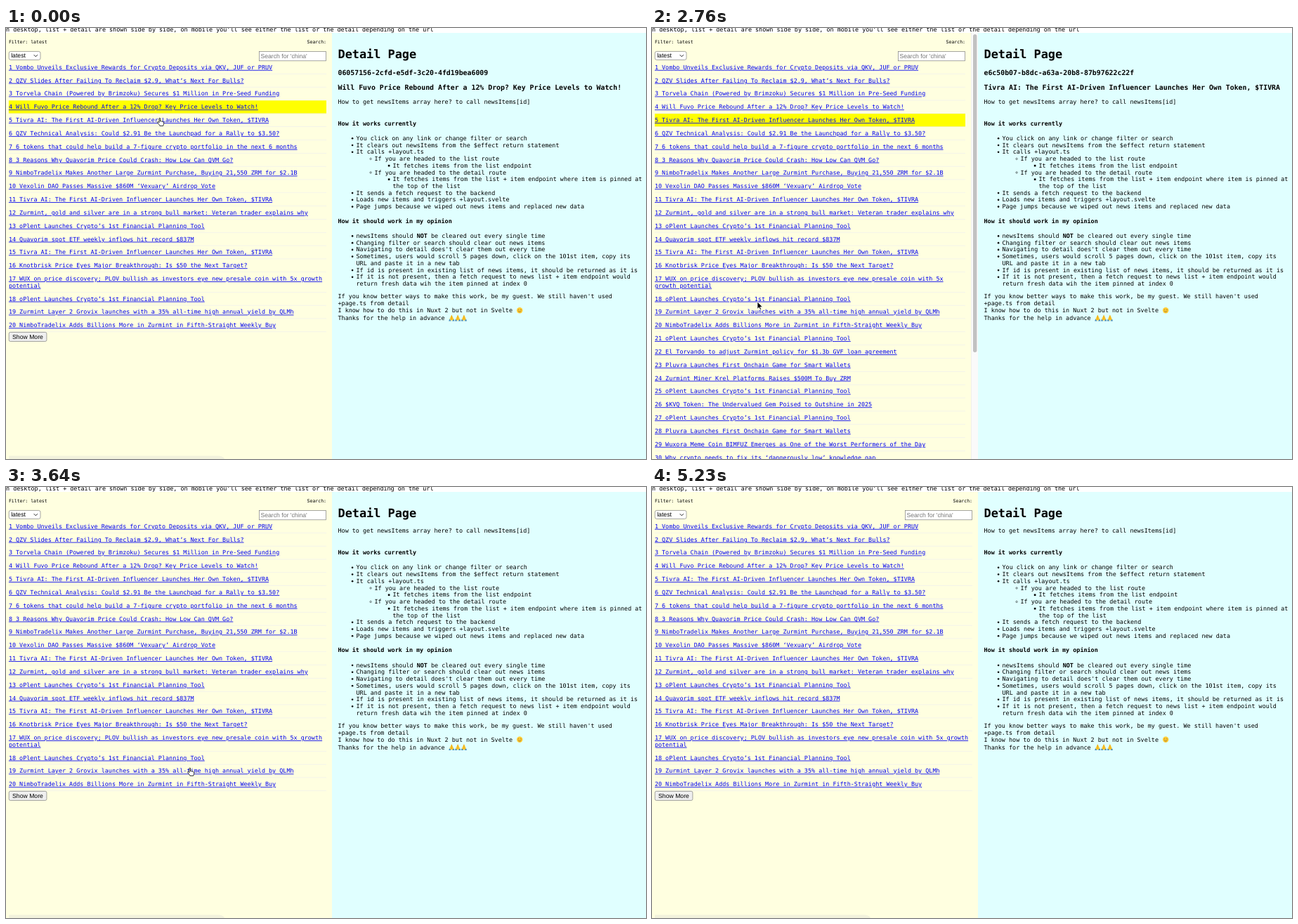
These frames come from a looping animation (911 by 614 pixels, 6210 ms). An HTML page:

```html
<!DOCTYPE html>
<html lang="en">
<head>
<meta charset="utf-8">
<title>List and detail</title>
<style>
html, body { margin: 0; width: 100%; height: 100%; overflow: hidden; background: #fff; }
svg { display: block; }
text { font: 8.44px "DejaVu Sans Mono", monospace; text-rendering: geometricPrecision; white-space: pre; }
.link { fill: #00e; text-decoration: underline; }
.ui { font: 8.67px "Liberation Sans", Arial, sans-serif; }
.small { font-size: 6.5px; }
.b { font-weight: bold; }
.h3 { font-size: 9.875px; font-weight: bold; }
.h1 { font-size: 16.88px; font-weight: bold; }
.box { stroke: #767676; stroke-width: .65; }
</style>
</head>
<body>
<svg width="911" height="614" viewBox="0 0 911 614">
  <clipPath id="pane"><rect y="7" width="464" height="607"/></clipPath>
  <text x="0" y="5.4">n desktop, list + detail are shown side by side, on mobile you'll see either the list or the detail depending on the url</text>
  <rect y="7" width="464" height="607" fill="#ffffe0"/>
  <rect x="464" y="7" width="447" height="607" fill="#e0ffff"/>
  <g clip-path="url(#pane)"><g id="list"></g></g>
  <g id="bar">
    <rect x="454.2" y="7" width="9.8" height="607" fill="#fafafa"/>
    <rect x="454.2" y="7" width=".65" height="607" fill="#e8e8e8"/>
    <rect id="thumb" x="457" width="5.4" height="453" rx="2.7" fill="#c1c1c1"/>
  </g>
  <path id="bubble" d="M4 614V609.5H302Q309 609.5 311 614Z" fill="#f2f2dc"/>
  <g id="detail"></g>
  <g id="cursor">
    <path id="arrow" d="M0 0V10.2L2.4 8 4 11.6 5.6 11 4 7.4H7.2Z" stroke="#fff" stroke-width=".7"/>
    <path id="hand" d="M3 1c0-1 1.6-1 1.6 0v4c.5-.6 1.6-.5 1.8.3 .6-.5 1.6-.3 1.7.5 .8-.2 1.5.1 1.5.9v2c0 1-.8 1.4-.9 2.7H3.9C3.7 9.9 1.5 8.4.6 6.6 .2 5.8 1 5.2 1.8 5.7L3 6.8Z" fill="#fff" stroke="#000" stroke-width=".8"/>
  </g>
</svg>
<script>
const TOOL = 'oPlent Launches Crypto’s 1st Financial Planning Tool';
const TOKEN = 'Tivra AI: The First AI-Driven Influencer Launches Her Own Token, $TIVRA';
const GAME = 'Pluvra Launches First Onchain Game for Smart Wallets';
const news = [
  'Vombo Unveils Exclusive Rewards for Crypto Deposits via QKV, JUF or PRUV',
  'QZV Slides After Failing To Reclaim $2.9, What’s Next For Bulls?',
  'Torvela Chain (Powered by Brimzoku) Secures $1 Million in Pre-Seed Funding',
  'Will Fuvo Price Rebound After a 12% Drop? Key Price Levels to Watch!',
  TOKEN,
  'QZV Technical Analysis: Could $2.91 Be the Launchpad for a Rally to $3.50?',
  '6 tokens that could help build a 7-figure crypto portfolio in the next 6 months',
  '3 Reasons Why Quavorim Price Could Crash: How Low Can QVM Go?',
  'NimboTradelix Makes Another Large Zurmint Purchase, Buying 21,550 ZRM for $2.1B',
  'Vexolin DAO Passes Massive $860M ‘Vexuary’ Airdrop Vote',
  TOKEN,
  'Zurmint, gold and silver are in a strong bull market: Veteran trader explains why',
  TOOL,
  'Quavorim spot ETF weekly inflows hit record $837M',
  TOKEN,
  'Knotbrisk Price Eyes Major Breakthrough: Is $50 the Next Target?',
  'WUX on price discovery; PLOV bullish as investors eye new presale coin with 5x growth potential',
  TOOL,
  'Zurmint Layer 2 Grovix launches with a 35% all-time high annual yield by QLMh',
  'NimboTradelix Adds Billions More in Zurmint in Fifth-Straight Weekly Buy',
  TOOL,
  'El Torvando to adjust Zurmint policy for $1.3b GVF loan agreement',
  GAME,
  'Zurmint Miner Krel Platforms Raises $500M To Buy ZRM',
  TOOL,
  '$KVQ Token: The Undervalued Gem Poised to Outshine in 2025',
  TOOL,
  GAME,
  'Wuxora Meme Coin BIMFUZ Emerges as One of the Worst Performers of the Day',
  'Why crypto needs to fix its ‘dangerously low’ knowledge gap',
  'TRUZ token listed by Kravoza and South Korea’s Dolvu – What is it?',
  '3 reasons why the NUBZ price and volume soared',
  'Quilt Pings by DPlayon at LumaVux: Win $80K in Prizes!',
  'Zurmint TOVA 2024: Plim DAO talks DeFi growth, blockchain security',
  'Sovrent Capital Says GZRK Actor Posed as Ex-Contractor to Pull Off $50 Million Hack',
  'UVKO Finance Introduces AI-Powered Decentralized Proprietary Trading Platform',
  'Zimpra CEO Dane Forthwicklow questions ’45 Signals’ omission of key QZV legal victory',
  '‘Buying the top forever’ – NimboTradelix bags 21.5K Zurmint at peak prices',
  'NimboTradelix’s Zurmint Stash Rises to 423,650 ZRM After Another Multi-Billion Dollar Purchase',
  'Altcoins that could double by Christmas: PLOV, VUK, and new DeFi token eyeing $1 in 2025'
];
const ids = { 4: '06057156-2cfd-e5df-3c20-4fd19bea6009', 5: 'e6c50b07-b8dc-a63a-20b8-87b97622c22f' };

// Bullet level, text; level 0 continues the line above at the level given third
const now = [
  [1, 'You click on any link or change filter or search'],
  [1, 'It clears out newsItems from the $effect return statement'],
  [1, 'It calls +layout.ts'],
  [2, 'If you are headed to the list route'],
  [3, 'It fetches items from the list endpoint'],
  [2, 'If you are headed to the detail route'],
  [3, 'It fetches items from the list + item endpoint where item is pinned at'],
  [0, 'the top of the list', 3],
  [1, 'It sends a fetch request to the backend'],
  [1, 'Loads new items and triggers +layout.svelte'],
  [1, 'Page jumps because we wiped out news items and replaced new data']
];
const wanted = [
  [1, 'newsItems should <tspan class="b">NOT</tspan> be cleared out every single time'],
  [1, 'Changing filter or search should clear out news items'],
  [1, "Navigating to detail does't clear them out every time"],
  [1, 'Sometimes, users would scroll 5 pages down, click on the 101st item, copy its'],
  [0, 'URL and paste it in a new tab', 1],
  [1, 'If id is present in existing list of news items, it should be returned as it is'],
  [1, 'If it is not present, then a fetch request to news list + item endpoint would'],
  [0, 'return fresh data wih the item pinned at index 0', 1]
];

const LINE = 9.74, ROW = 18.83, LEFT = 3.9, RIGHT = 472.5;
const $ = id => document.getElementById(id);
const text = (x, y, s, cls = '') => `<text x="${x}" y="${y}" class="${cls}">${s}</text>`;
const rect = (x, y, w, h, fill, more = '') =>
  `<rect x="${x}" y="${y}" width="${w}" height="${h}" fill="${fill}" ${more}/>`;

function wrap(s, max) {
  const lines = [''];
  for (const word of s.split(' ')) {
    const last = lines[lines.length - 1], next = last ? last + ' ' + word : word;
    if (next.length > max) lines.push(word); else lines[lines.length - 1] = next;
  }
  return lines;
}

function drawList(long, picked, hover) {
  const end = long ? 446 : 456, wide = end - LEFT;
  let out = text(LEFT, 21.8, 'Filter: latest', 'small') + text(end - 27.4, 21.8, 'Search:', 'small')
    + rect(4.2, 33.4, 44.8, 12, '#fff', 'class="box" rx="2.5"') + text(7.2, 42.4, 'latest', 'ui')
    + '<path d="M39.7 38.2l2.6 2.6 2.6-2.6" fill="none" stroke="#222"/>'
    + rect(end - 95.6, 33.6, 95.2, 13.2, '#fff', 'class="box"')
    + `<g fill="#757575">${text(end - 93.6, 43.1, "Search for 'china'", 'ui')}</g>`;
  let y = 46.8;
  news.slice(0, long ? 40 : 20).forEach((title, i) => {
    const lines = wrap(i + 1 + ' ' + title, long ? 86 : 88);
    const high = ROW + (lines.length - 1) * LINE;
    if (i + 1 === picked) out += rect(LEFT, y, wide, high, '#ff0');
    out += rect(LEFT, y + high - .65, wide, .65, '#eee');
    lines.forEach((s, j) => out += text(LEFT, y + 12 + j * LINE, s, 'link'));
    y += high;
  });
  return out + rect(4.2, y + .3, 53.7, 13, hover ? '#e5e5e5' : '#efefef', 'class="box" rx="2"')
    + text(9.1, y + 9.7, 'Show More', 'ui');
}

function bullets(rows, y) {
  return rows.map(([level, s, hang], i) => {
    const x = RIGHT + 26 * (level || hang), by = y + i * LINE, cx = x - 5.4, cy = by - 2.6;
    const mark = [
      '',
      `<circle cx="${cx}" cy="${cy}" r="1.3"/>`,
      `<circle cx="${cx}" cy="${cy}" r="1.2" fill="none" stroke="#000" stroke-width=".5"/>`,
      rect(cx - 1.3, cy - 1.3, 2.6, 2.6, '#000')
    ][level];
    return mark + text(x, by, s);
  }).join('');
}

const smile = `<g transform="translate(731.2 402.2)"><circle r="4.2" fill="#fc3"/>
  <path d="M-2.4 -.6q.8-1 1.6 0M.8 -.6q.8-1 1.6 0M-2 1.2q2 2.2 4 0" fill="none" stroke="#753" stroke-width=".7"/></g>`;
const pray = x => `<g transform="translate(${x} 408.6)">
  <path d="M4.3 0L1.8 5 1 8H7.6L6.8 5Z" fill="#fc3"/><path d="M4.3 1V7" stroke="#c80" stroke-width=".6"/>
  <path d="M.2 8.8L1.3 6 3.6 8.8ZM8.4 8.8L7.3 6 5 8.8Z" fill="#48b"/></g>`;

function drawDetail(picked) {
  const head = picked
    ? text(RIGHT, 66.8, ids[picked], 'h3') + text(RIGHT, 88.3, news[picked - 1], 'h3') : '';
  return text(RIGHT, 42.6, 'Detail Page', 'h1') + head
    + `<g transform="translate(0 ${picked ? 0 : -42.4})">`
    + text(RIGHT, 107.6, 'How to get newsItems array here? to call newsItems[id]')
    + text(RIGHT, 138.5, 'How it works currently', 'b') + bullets(now, 159.8)
    + text(RIGHT, 277.8, 'How it should work in my opinion', 'b') + bullets(wanted, 299)
    + text(RIGHT, 385.3, "If you know better ways to make this work, be my guest. We still haven't used")
    + text(RIGHT, 395, '+page.ts from detail')
    + text(RIGHT, 405.2, 'I know how to do this in Nuxt 2 but not in Svelte') + smile
    + text(RIGHT, 416.2, 'Thanks for the help in advance') + [630, 638.8, 647.6].map(pray).join('') + '</g>';
}

// Cursor path: step, x, y
const path = [
  [-3, 215, 128], [1, 215, 128], [7, 1, 409], [9, 14, 426], [11, 33, 447], [13, 33, 447],
  [15, 168, 447], [16, 168, 447], [20, 46, 438], [22, 46, 438], [24, 130, 395], [26, 130, 395],
  [28, 150, 390], [31, 150, 390], [34, 258, 400], [39, 258, 400], [40, 384, 407], [46, 300, 340],
  [48, 184, 300], [51, 655, 156], [54, 628, 346], [56, 380, 215]
];
const scroll = [[-3, 0], [29, 0], [31, 228.5]];

function at(keys, k) {
  const i = keys.findIndex(p => p[0] > k);
  if (i < 0) return keys[keys.length - 1].slice(1);
  const a = keys[i - 1], b = keys[i], f = (k - a[0]) / (b[0] - a[0]);
  return a.slice(1).map((v, j) => v + (b[j + 1] - v) * f);
}
const show = (id, on) => $(id).setAttribute('visibility', on ? 'visible' : 'hidden');

let drawn;
function frame(time) {
  const k = Math.floor((time % 6210 - 222) / 87.5);
  const picked = k < 1 ? 4 : k < 39 ? 5 : 0;
  const long = k >= 23 && k < 39;
  const hover = k === 10 || k >= 19 && k < 23;
  const state = [long, picked, hover].join();
  if (state !== drawn) {
    drawn = state;
    $('list').innerHTML = drawList(long, picked, hover);
    $('detail').innerHTML = drawDetail(picked);
  }
  const [top] = long ? at(scroll, k) : [0];
  $('list').setAttribute('transform', `translate(0 ${-top})`);
  $('thumb').setAttribute('y', 9 + top * .735);
  show('bar', long);
  show('thumb', long);
  show('bubble', !long);
  const hand = k < 10 || k >= 35 && k < 42;
  show('hand', hand && k < 57);
  show('arrow', !hand && k < 57);
  $('cursor').setAttribute('transform', `translate(${at(path, k)})`);
  requestAnimationFrame(frame);
}
frame(0);
</script>
</body>
</html>
```
